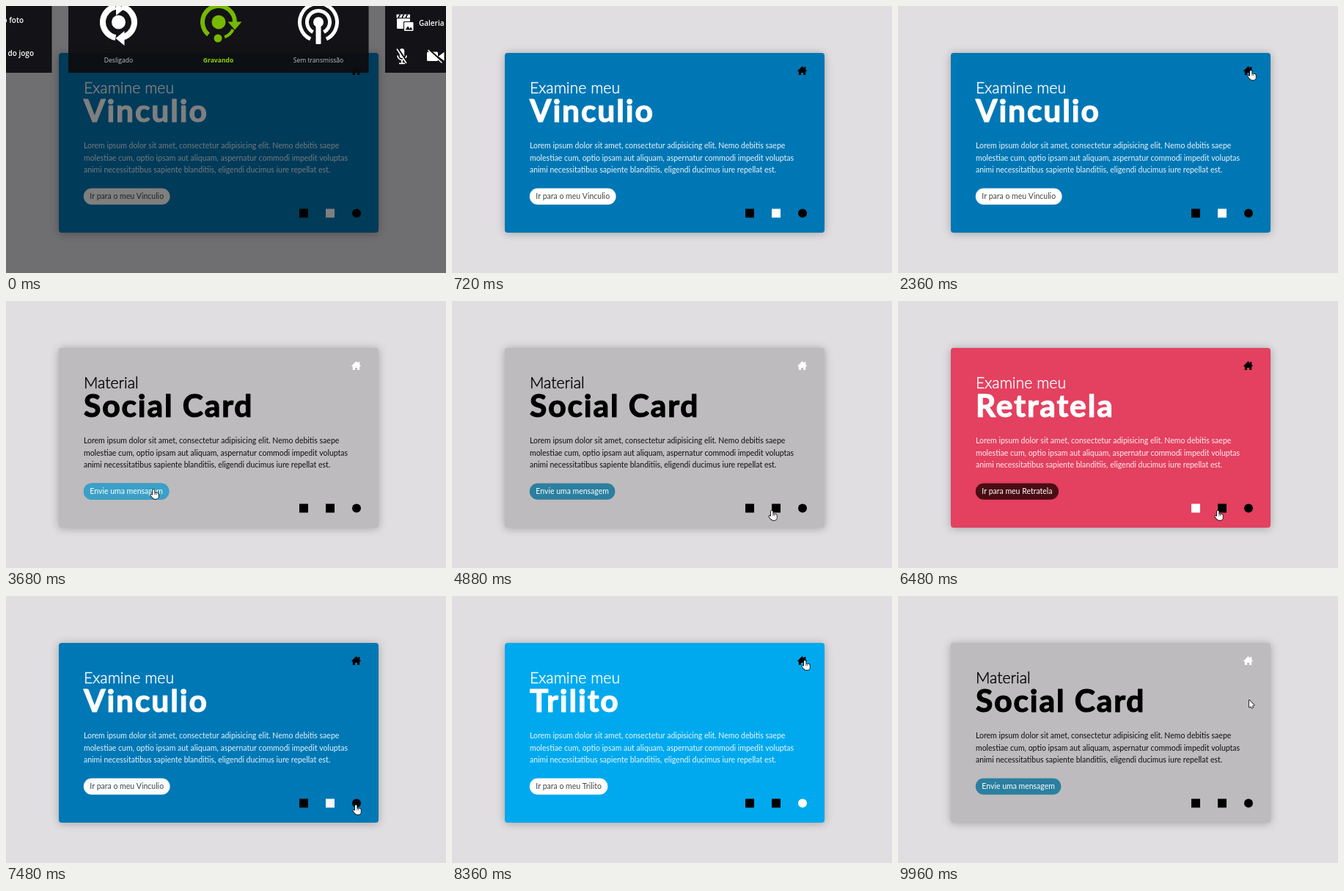
Recreate the animation shown at these times as an HTML page with a canvas. Size 600 by 364 pixels, loop 10000 ms.

```html
<!DOCTYPE html>
<html lang="pt-BR">
<head>
<meta charset="utf-8">
<title>Social card</title>
<style>
html, body { margin: 0; width: 100%; height: 100%; overflow: hidden; background: #e0dee1; }
canvas { display: block; width: 600px; height: 364px; }
</style>
</head>
<body>
<canvas id="stage"></canvas>
<script>
const W = 600, H = 364, LOOP = 10000, FADE = 500;
const canvas = document.getElementById('stage');
const ctx = canvas.getContext('2d');
const dpr = window.devicePixelRatio || 1;
canvas.width = W * dpr;
canvas.height = H * dpr;

const CARD_FONT = 'Lato, "Open Sans", sans-serif';
const PANEL_FONT = '"Open Sans", "Noto Sans", sans-serif';
const LOREM = [
  'Lorem ipsum dolor sit amet, consectetur adipisicing elit. Nemo debitis saepe',
  'molestiae cum, optio ipsam aut aliquam, aspernatur commodi impedit voluptas',
  'animi necessitatibus sapiente blanditiis, eligendi ducimus iure repellat est.'
];

const social = { ink: '#fff', small: 'Examine meu', button: '#fff', buttonInk: '#444' };
const themes = {
  home: { bg: '#bdbbbd', ink: '#000', small: 'Material', title: 'Social Card',
    label: 'Envie uma mensagem', button: '#2b7f9f', buttonInk: '#fff' },
  photo: { ...social, bg: '#e4405f', title: 'Retratela',
    label: 'Ir para meu Retratela', button: '#4a0d14', buttonInk: '#fff' },
  work: { ...social, bg: '#0077b5', title: 'Vinculio', label: 'Ir para o meu Vinculio' },
  chat: { ...social, bg: '#00a9ee', title: 'Trilito', label: 'Ir para o meu Trilito' }
};

// Theme chosen at each click
const clicks = [
  { at: -FADE, theme: 'work' }, { at: 2360, theme: 'home' }, { at: 5360, theme: 'photo' },
  { at: 6520, theme: 'work' }, { at: 7440, theme: 'chat' }, { at: 9160, theme: 'home' }
];

const spots = {
  entry: { x: 136, y: 237 }, corner: { x: 537, y: 40 }, rest: { x: 479, y: 142 },
  home: { x: 481, y: 88 }, button: { x: 201, y: 257 },
  photo: { x: 409, y: 285 }, work: { x: 436, y: 286 }, chat: { x: 477, y: 285 }
};

// Pointer journeys; bend pushes the path sideways
const moves = [
  { from: 1480, until: 1820, to: 'corner' },
  { from: 1820, until: 2120, to: 'home' },
  { from: 3080, until: 3680, to: 'button', bend: -150 },
  { from: 3840, until: 4840, to: 'work', bend: 335 },
  { from: 4880, until: 5080, to: 'photo' },
  { from: 5960, until: 6480, to: 'work' },
  { from: 7080, until: 7400, to: 'chat' },
  { from: 7920, until: 8360, to: 'home' },
  { from: 9460, until: 9960, to: 'rest' }
];

const ramp = (t, a, b) => {
  const p = Math.min(1, Math.max(0, (t - a) / (b - a)));
  return p * p * (3 - 2 * p);
};

function box(x, y, w, h, r, color) {
  ctx.beginPath();
  ctx.roundRect(x, y, w, h, r);
  ctx.fillStyle = color;
  ctx.fill();
}

function disc(x, y, r, color) {
  ctx.beginPath();
  ctx.arc(x, y, r, 0, Math.PI * 2);
  ctx.fillStyle = color;
  ctx.fill();
}

// Triangle pointing up, turned by a share of a half circle
function triangle(x, y, w, h, turn, color) {
  ctx.save();
  ctx.translate(x, y);
  ctx.rotate(turn * Math.PI);
  ctx.beginPath();
  ctx.moveTo(-w / 2, h / 2);
  ctx.lineTo(0, -h / 2);
  ctx.lineTo(w / 2, h / 2);
  ctx.fillStyle = color;
  ctx.fill();
  ctx.restore();
}

function arc(x, y, r, from, to, width, color) {
  ctx.beginPath();
  ctx.arc(x, y, r, from * Math.PI, to * Math.PI);
  ctx.lineWidth = width;
  ctx.strokeStyle = color;
  ctx.stroke();
}

function line(x1, y1, x2, y2, width, color) {
  ctx.beginPath();
  ctx.moveTo(x1, y1);
  ctx.lineTo(x2, y2);
  ctx.lineWidth = width;
  ctx.strokeStyle = color;
  ctx.stroke();
}

function text(str, x, y, font, color, align = 'left') {
  ctx.font = font;
  ctx.textAlign = align;
  ctx.fillStyle = color;
  ctx.fillText(str, x, y);
}

// A thin round outline softens the letter ends
function softText(str, y, font, color, edge, spacing) {
  ctx.save();
  ctx.letterSpacing = spacing;
  ctx.lineJoin = 'round';
  ctx.lineWidth = edge;
  ctx.strokeStyle = color;
  text(str, 106, y, font, color);
  ctx.strokeText(str, 106, y);
  ctx.restore();
}

function house(color) {
  triangle(477.5, 85.5, 13.5, 7, 0, color);
  box(480.2, 83, 2.1, 5, 0, color);
  box(472.8, 88, 9.4, 3, 0, color);
  for (const x of [472.8, 479]) box(x, 90, 3.2, 4, 0, color);
}

function drawCard(name, hover) {
  const th = themes[name];
  const iconColor = key => key === name ? '#fff' : '#000';
  const body = `400 10.5px ${CARD_FONT}`;
  box(72, 64, 436, 245, 4, th.bg);
  softText(th.small, 119, `300 21.3px ${CARD_FONT}`, th.ink, 0.45, '0px');
  softText(th.title, 158, `700 42.5px ${CARD_FONT}`, th.ink, 1.2, '1.9px');
  ctx.globalAlpha *= 0.92;
  LOREM.forEach((row, i) => text(row, 106, 194.4 + i * 16.3, body, th.ink));
  ctx.globalAlpha /= 0.92;

  const width = ctx.measureText(th.label).width + 17;
  box(105.8, 248.5, width, 22.3, 11, th.button);
  if (name === 'home' && hover > 0) {
    const alpha = ctx.globalAlpha;
    ctx.globalAlpha = alpha * hover;
    box(105.8, 248.5, width, 22.3, 11, '#3ba0c8');
    ctx.globalAlpha = alpha;
  }
  text(th.label, 114.3, 263.1, body, th.buttonInk);

  house(iconColor('home'));
  ['photo', 'work', 'chat'].forEach((key, i) =>
    box(400 + 36 * i, 276.5, 12, 12, key === 'chat' ? 6 : 0, iconColor(key)));
}

function drawPage(t) {
  ctx.fillStyle = '#e0dee1';
  ctx.fillRect(0, 0, W, H);
  ctx.save();
  ctx.shadowColor = 'rgba(0,0,0,.28)';
  ctx.shadowBlur = 12 * dpr;
  ctx.shadowOffsetY = dpr;
  box(72, 64, 436, 245, 4, '#bdbbbd');
  ctx.restore();

  const i = clicks.findLastIndex(c => c.at <= t);
  const { at, theme } = clicks[i];
  const p = ramp(t, at, at + FADE);
  const hover = ramp(t, 3500, 3670) * (1 - ramp(t, 3880, 4100));
  if (p < 1) drawCard(clicks[i - 1].theme, hover);
  ctx.globalAlpha = p;
  drawCard(theme, hover);
  ctx.globalAlpha = 1;
}

function replayIcon(x, y) {
  const c = '#fff';
  disc(x, y, 9.5, c);
  arc(x, y, 21.5, 0.56, 1.44, 8, c);
  arc(x, y, 21.5, -0.44, 0.44, 8, c);
  triangle(x + 2, y - 18, 18, 11, 0.5, c);
  triangle(x + 2, y + 22, 20, 12, -0.5, c);
}

function recordIcon(x, y) {
  const c = '#76b900';
  disc(x, y, 9.5, c);
  arc(x, y, 22, 0.72, 2, 6, c);
  triangle(x + 22, y + 5, 19, 11, 1, c);
  arc(x, y, 22, 0.15, 0.38, 4, c);
  disc(x - 1, y + 22, 5.5, c);
}

function castIcon(x, y) {
  const c = '#fff';
  arc(x, y, 25.5, 0.64, 2.36, 5, c);
  arc(x, y, 15.5, 0.66, 2.34, 5, c);
  disc(x, y, 7, c);
  box(x - 3.5, y, 7, 30, 1, c);
}

function galleryIcon() {
  const c = '#fff', dark = '#0e0e10';
  box(533, 17, 18, 14, 1, c);
  box(532.5, 11.5, 18.5, 4.5, 0, c);
  for (let x = 535; x < 550; x += 5) line(x, 16, x + 2.5, 11.5, 1.6, dark);
  box(542, 21, 14, 13.5, 1, dark);
  box(543, 22, 12.5, 12, 1, c);
  triangle(548, 30, 7, 5, 0, dark);
  triangle(552, 30.5, 5, 4, 0, dark);
}

function slash(x, y, w, h) {
  line(x + 1.5, y - 0.5, x + w + 1.5, y + h - 0.5, 2.5, '#0e0e10');
  line(x, y, x + w, y + h, 1.6, '#fff');
}

function muteIcons() {
  const c = '#fff';
  box(536.8, 58, 6.4, 13, 3.2, c);
  arc(540, 67.5, 6, 0, 1, 1.7, c);
  line(540, 73, 540, 78, 1.8, c);
  line(536, 78.3, 544, 78.3, 1.8, c);
  slash(533, 58.5, 13, 19.5);
  box(574, 62.5, 15, 12.5, 1.5, c);
  triangle(593.5, 68.7, 12, 8, -0.5, c);
  slash(575.5, 60, 19, 17.5);
}

function drawOverlay(alpha) {
  if (alpha <= 0) return;
  ctx.save();
  ctx.globalAlpha = alpha * 0.5;
  ctx.fillStyle = '#000';
  ctx.fillRect(0, 0, W, H);
  ctx.globalAlpha = alpha * 0.94;
  box(0, 0, 62.5, 91, 0, '#0d0d10');
  box(85, 0, 409.5, 91, 0, '#0d0d10');
  box(517, 0, 83, 91, 0, '#0d0d10');
  ctx.globalAlpha = alpha;
  replayIcon(153.5, 22);
  recordIcon(290, 22);
  castIcon(426, 22);
  galleryIcon();
  muteIcons();
  const small = `8.6px ${PANEL_FONT}`, strong = `600 10px ${PANEL_FONT}`;
  text('Desligado', 153.5, 77, small, '#c4c4c4', 'center');
  text('Gravando', 289.5, 77, `700 ${small}`, '#8fd400', 'center');
  text('Sem transmissão', 426, 77, small, '#c4c4c4', 'center');
  text('o foto', 24, 22.5, strong, '#fff', 'right');
  text('do jogo', 38, 67.5, strong, '#fff', 'right');
  text('Galeria', 563, 27, strong, '#fff');
  ctx.restore();
}

function pointerAt(t) {
  const i = moves.findLastIndex(m => m.from <= t);
  const { from, until, to, bend = 0 } = moves[i];
  const a = spots[i ? moves[i - 1].to : 'entry'], b = spots[to];
  const p = ramp(t, from, until);
  const dx = b.x - a.x, dy = b.y - a.y;
  const push = 2 * p * (1 - p) * bend / Math.hypot(dx, dy);
  return { x: a.x + dx * p + dy * push, y: a.y + dy * p - dx * push };
}

function isClickable(x, y) {
  const near = (cx, cy, w, h) => Math.abs(x - cx) < w && Math.abs(y - cy) < h;
  return near(478, 88, 8, 8) || near(164, 260, 59, 11) ||
    [406, 442, 478].some(cx => near(cx, 283, 9, 8));
}

function outline() {
  ctx.lineJoin = 'round';
  ctx.lineWidth = 1.7;
  ctx.strokeStyle = '#111';
  ctx.stroke();
  ctx.fillStyle = '#fff';
  ctx.fill();
}

function hand() {
  ctx.beginPath();
  ctx.roundRect(-1, 0, 2.4, 9, 1.2);
  ctx.roundRect(-1, 4.8, 7.8, 8, [1, 2, 3, 3]);
  ctx.ellipse(-1.5, 9, 1.2, 2.8, -0.7, 0, Math.PI * 2);
  outline();
  for (const x of [1.7, 3.7]) line(x, 5, x, 7.4, 0.6, '#111');
}

function arrow() {
  line(2, 6, 4.6, 11, 3.2, '#111');
  ctx.beginPath();
  ctx.moveTo(0, 0);
  ctx.lineTo(0, 9.5);
  ctx.lineTo(6.7, 6.8);
  ctx.closePath();
  outline();
  line(2, 6, 4.3, 10.4, 1.6, '#fff');
}

function drawPointer(t) {
  if (t < moves[0].from) return;
  const { x, y } = pointerAt(t);
  ctx.save();
  ctx.translate(x, y);
  if (isClickable(x, y)) hand();
  else arrow();
  ctx.restore();
}

function frame(now) {
  const t = now % LOOP;
  ctx.setTransform(dpr, 0, 0, dpr, 0, 0);
  drawPage(t);
  drawOverlay(1 - ramp(t, 20, 720));
  drawPointer(t);
  requestAnimationFrame(frame);
}
requestAnimationFrame(frame);
</script>
</body>
</html>
```
